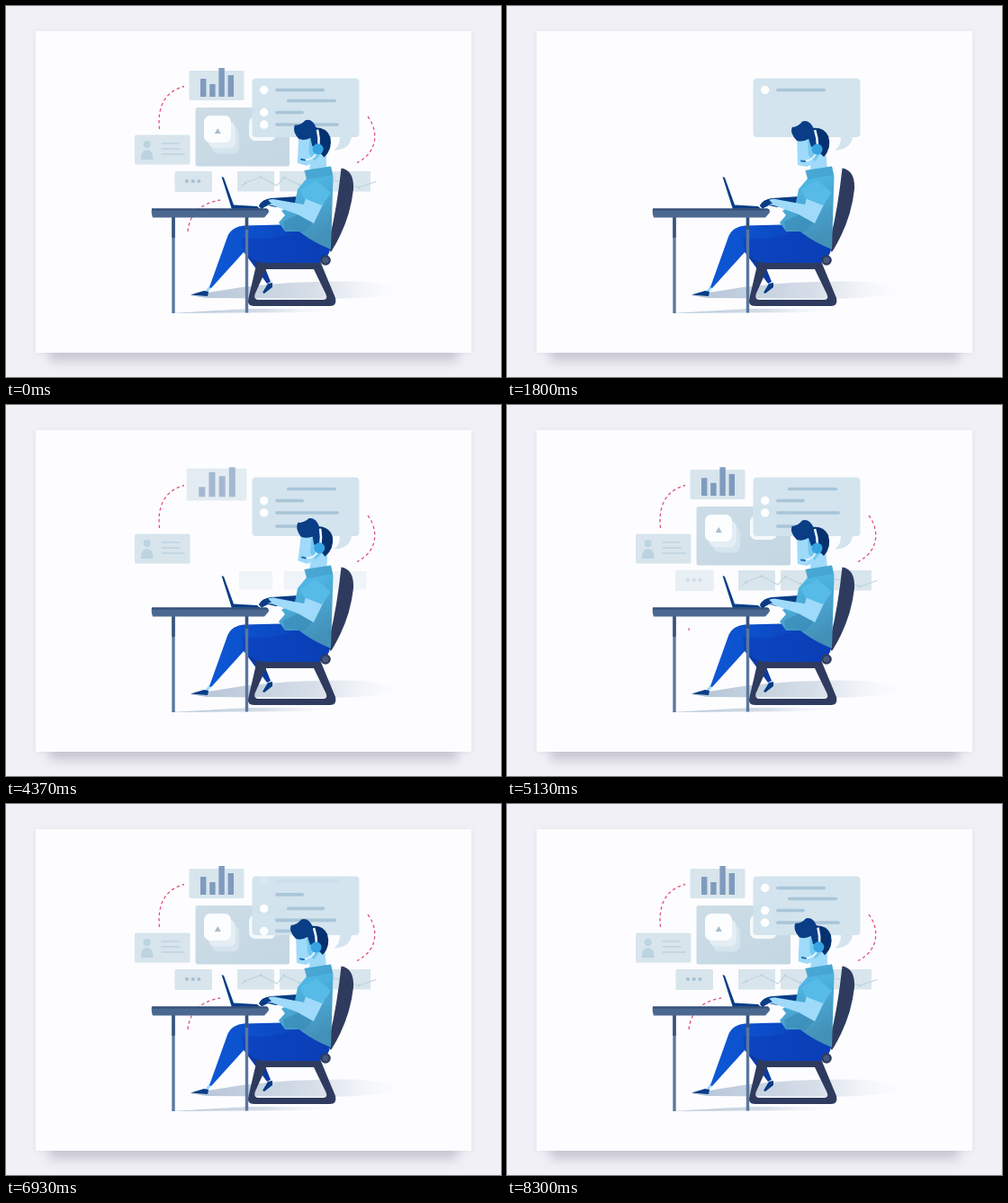
Write an HTML page that moves like this. It is 550 px wide and 413 px high and loops after 8330 ms.

```html
<!DOCTYPE html>
<html lang="en">
<head>
<meta charset="utf-8">
<title>At the desk</title>
<style>
html, body { margin: 0; width: 100%; height: 100%; overflow: hidden; background: #f1f0f6; }
svg { display: block; width: 100vw; height: 100vh; }
.glow { fill: #77778c; opacity: .3; filter: blur(6px); }
.sheet { fill: #fdfdff; filter: drop-shadow(0 1px 3px rgba(110, 110, 140, .1)); }
.dash { fill: none; stroke: #e0527f; stroke-width: 1.3; }
.card { fill: #d8e5ed; }
.mark { fill: #bcd3e0; }
.thin { fill: none; stroke: #bdd2df; stroke-width: 1.6; stroke-linecap: round; }
.navy { fill: #093d86; }
.chair { fill: #2f3b5e; }
.skin { fill: #9fdafa; }
</style>
</head>
<body>
<svg viewBox="0 0 550 413" preserveAspectRatio="none">
  <defs>
    <linearGradient id="floor">
      <stop offset="0" stop-color="#b4c4d7"/><stop offset=".55" stop-color="#d6dee8"/>
      <stop offset="1" stop-color="#fdfdff" stop-opacity="0"/>
    </linearGradient>
    <linearGradient id="shirt" x2=".3" y2="1">
      <stop offset=".3" stop-color="#4fb6e4"/><stop offset="1" stop-color="#4390b8"/>
    </linearGradient>
    <linearGradient id="jeans">
      <stop offset="0" stop-color="#0d58d6"/><stop offset="1" stop-color="#0b3fb6"/>
    </linearGradient>
    <linearGradient id="pane" y2="1">
      <stop offset="0" stop-color="#cddde7"/><stop offset="1" stop-color="#c3d6e2"/>
    </linearGradient>
  </defs>
  <rect class="glow" x="48" y="372" width="454" height="24"/>
  <rect class="sheet" x="33" y="28" width="484" height="358"/>
  <path fill="url(#floor)" d="M205 322L262 313Q330 305 400 307L456 318Q410 325 362 326L222 325Z"/>
  <path fill="url(#floor)" d="M183 342L270 337H376L340 341Z"/>

  <g id="person">
    <rect class="card" x="143" y="143.500" width="61.500" height="33" rx="1.500"/>
    <circle class="mark" cx="156.700" cy="154" r="4"/>
    <path class="mark" d="M150 171Q150 160 156.700 160T163.500 171Z"/>
    <path class="thin" d="M173 153H192M173 159H193M173 165H198"/>
  </g>
  <g id="chart">
    <rect class="card" x="203.500" y="72" width="61" height="33" rx="1.500"/>
    <g id="bars" fill="#7f9bbd"></g>
  </g>
  <g id="window">
    <rect x="210.500" y="113" width="104.500" height="65.500" rx="2.500" fill="url(#pane)"/>
    <rect x="229" y="135" width="30" height="29.500" rx="7" fill="#d5e4ed"/>
    <rect x="225" y="129" width="30" height="29.500" rx="7" fill="#e5eef4"/>
    <rect x="220" y="122" width="30" height="30" rx="7" fill="#fbfdfe"/>
    <path d="M235.300 136L238.800 142H231.800Z" fill="#a9bccb"/>
    <rect x="270" y="123" width="30" height="27" rx="7" fill="#f4f9fb"/>
  </g>
  <g id="dots">
    <rect class="card" x="187.500" y="184" width="41.500" height="23" rx="1.500"/>
    <g fill="#a8c1d2"><circle cx="201" cy="195" r="2.100"/><circle cx="207.700" cy="195" r="2.100"/><circle cx="214.300" cy="195" r="2.100"/></g>
  </g>
  <rect id="tileA" class="card" x="257" y="184" width="41" height="22.500"/>
  <rect id="tileB" class="card" x="304" y="184" width="101" height="22.500"/>
  <g id="wave">
    <path class="thin" style="stroke-width:1.100" d="M262 200L268 196 283 190.500 301 200 309 191 330 201 350 192 370 195 392 202 411 195.500"/>
    <g class="mark"><circle cx="266" cy="197" r="1.500"/><circle cx="283" cy="190.500" r="1.500"/><circle cx="309" cy="191" r="1.500"/><circle cx="326" cy="199" r="1.500"/><circle cx="392" cy="202" r="1.500"/></g>
  </g>
  <path class="dash" id="arcL" d="M170.500 137C168 115 175 95 198 89.500"/>
  <path class="dash" id="arcR" d="M402 123C413 137 415 162 390 174.500"/>
  <path class="dash" id="arcD" d="M202 251C204 232 215 220 238 216"/>

  <g id="bubble">
    <path fill="#d2e4ee" fill-opacity=".97" d="M278 80.500H388Q392.500 80.500 392.500 85V142Q392.500 146 388 146H384Q382 160 364 160.500Q371 156 371 146H278Q273.500 146 273.500 142V85Q273.500 80.500 278 80.500Z"/>
    <g id="rows"></g>
  </g>

  <!-- chair -->
  <path class="chair" d="M372.500 180.500Q387 183 386 204Q382 241 361 274L357 268Q367 232 372.500 180.500Z"/>
  <!-- far leg -->
  <path fill="#0a3aa6" d="M262 271L282 277 294 307 290 309 276 290Z"/>
  <path class="navy" d="M291 309L296 308 296 313 287 320 285 319Z"/>
  <path class="chair" fill-rule="evenodd" d="M279 284H349L366 325Q368 334 360 334H276Q267 334 269.500 325ZM289 293L276.500 321Q275 327 281 327H352Q358 327 355.500 321L342 293Z"/>
  <!-- near leg -->
  <path class="skin" d="M226 311L228 314 224 319 221 318Z"/>
  <path class="navy" d="M205 321.500L220 317 225 318 224 323Z"/>
  <path fill="url(#jeans)" d="M226 313L246 257Q250 246 264 244.500L325 243Q352 252 360 269Q360 280 348 286H286Q272 283 265 273L228 314Z"/>
  <path fill="#0a3fb8" d="M262 258Q300 262 322 250L358 270Q356 282 347 286H286Q272 283 264 272Z" opacity=".6"/>
  <circle class="chair" cx="355" cy="283" r="5.800"/>
  <circle cx="355" cy="283" r="3.500" fill="#46597c"/>

  <!-- laptop, far arm, desk -->
  <path class="navy" d="M239.500 190L242 191 253 221.500 279 223 283 226.500H251Z"/>
  <path class="navy" d="M281 222Q285 215 294 214L324 212 326 220 300 224 291 222 285 225Z"/>
  <rect x="184.300" y="235" width="3.400" height="107" fill="#5b789f"/>
  <rect x="184.300" y="235" width="3.400" height="23" fill="#37537c"/>
  <rect x="265.800" y="235" width="3.400" height="106.500" fill="#5b789f"/>
  <rect x="265.800" y="235" width="3.400" height="14" fill="#37537c"/>
  <path fill="#4b6990" d="M162 225.500H289Q294 228 291 231L287 235.500H163Q161 231 162 225.500Z"/>
  <path fill="#334f79" d="M162 225.500H290L292 227.500H162Z"/>

  <g id="head">
    <path class="skin" d="M338 158H354L356 183 337 184Z"/>
    <path class="skin" d="M322 146L345 142 352 160 346 173 333 179 323 177Z"/>
    <path fill="#72c8f0" d="M334 150L345 148 349 164 342 173 335 166Z"/>
    <path fill="#06316f" d="M338 136Q352 134 357 145Q361 158 352 168L347 163Z"/>
    <path class="navy" d="M322 150Q314 142 316.500 135Q323 135 328 128.500Q336 126 341 137L346 154 338 157 335 148Q328 152 322 150Z"/>
    <path fill="none" stroke="#e8f6fd" stroke-width="2.600" d="M342 138Q345 147 345 156"/>
    <path fill="none" stroke="#e8f6fd" stroke-width="1.800" d="M343 164Q340 173 328 173"/>
    <path stroke="#1d6fb5" stroke-width="2" stroke-linecap="round" d="M327 172.500L331 173"/>
    <circle cx="344.500" cy="159.500" r="6" fill="#37a3e2"/>
  </g>

  <!-- torso -->
  <path fill="url(#shirt)" d="M332 183L361 178.500 363.500 190 361 271Q339 262 326 251L310 251 303 241 310 233 306 228 321 219 324 204 334 192Z"/>
  <path fill="#3f93bf" d="M331 183L361 178.500 363 188 334 193Z" opacity=".45"/>
  <path fill="#398dba" d="M308 240L331 229 341 241 331 252Q320 248 310 250Z" opacity=".7"/>
  <g id="arm">
    <path class="skin" d="M286 221Q290 215 297 215L331 221 334 210 354 217 342 242 324 232 296 222Z"/>
    <path class="navy" d="M281 223Q284 216 291 216L295 220 289 222 284 226Z"/>
  </g>
  <path fill="#57bbe8" d="M327 204L345 194 361 208 351 222 331 214Z"/>
</svg>
<script>
const LOOP = 8330;
const $ = id => document.getElementById(id);
const clamp = v => Math.max(0, Math.min(1, v));
const ramp = (t, a, b) => clamp((t - a) / (b - a));
const smooth = (t, a, b) => { const u = ramp(t, a, b); return u * u * (3 - 2 * u); };
const back = (u, k) => 1 + (k + 1) * (u - 1) ** 3 + k * (u - 1) ** 2;

// id, pivot, enter time, duration, overshoot, exit time
const pops = [
  ['person', 173.5, 160, 3275, 420, 2.2, 120],
  ['chart', 234, 88.5, 4130, 450, 1.7, 160],
  ['tileA', 277.5, 195, 4235, 450, 1.7, 60],
  ['tileB', 354.5, 195, 4235, 450, 1.7, 60],
  ['window', 263, 146, 4550, 450, 1.2, 100],
  ['dots', 208, 195.5, 4950, 450, 1.7, 30],
  ['bubble', 366, 160, 950, 450, 1, 250]
];
// id, drawing start, drawing end
const arcs = [['arcL', 3450, 4100], ['arcR', 3550, 4220], ['arcD', 5050, 5650]];

const add = (tag, parent, attrs) => {
  const el = document.createElementNS('http://www.w3.org/2000/svg', tag);
  for (const k in attrs) el.setAttribute(k, attrs[k]);
  return parent.appendChild(el);
};

const early = [10, 25, 21, 30], late = [20, 14, 32, 24];
const bars = early.map((h, i) => add('rect', $('bars'), { x: 216 + 10.2 * i, width: 6.4 }));

// offset down the list, line start, line end, has avatar, first appearance
const LIST = 94;
const rows = [
  [0, 299, 354, 1, 1520], [12, 312, 367, 0, 1900], [25, 299, 331, 1, 2100], [38.5, 299, 370, 1, 2300],
  [53.5, 299, 331, 0, 2450], [69, 312, 354, 1, 2450], [82, 299, 367, 0, 2450]
].map(([top, a, b, avatar, start]) => {
  const el = add('g', $('rows'), {});
  if (avatar) add('circle', el, { cx: 286.7, r: 4.7, fill: '#fff' });
  add('rect', el, { x: a, y: -1.8, width: b - a, height: 3.6, rx: 1.8, fill: '#a9c5d8' });
  return { el, top, start };
});
// one scroll step per row
const steps = [[2550, 2900], [5860, 6115], [6450, 6700], [6820, 7040], [7250, 7500], [7650, 7900], [8020, 8290]];

function draw(t) {
  const leaving = t < 800;
  for (const [id, x, y, start, dur, k, end] of pops) {
    const u = ramp(t, start, start + dur);
    const left = 1 - smooth(t, end, end + 380);
    const s = leaving ? left : u && back(u, k);
    $(id).setAttribute('transform', `translate(${x} ${y}) scale(${s}) translate(${-x} ${-y})`);
    $(id).setAttribute('opacity', leaving ? left : clamp(u * 1.3));
  }
  $('wave').setAttribute('opacity', leaving ? 1 - ramp(t, 30, 300) : ramp(t, 4600, 5100));

  for (const [id, a, b] of arcs) {
    const len = $(id).getTotalLength();
    const shown = len * (leaving ? 1 - smooth(t, 40, 500) : smooth(t, a, b));
    const n = Math.floor(shown / 6.5);
    $(id).setAttribute('stroke-dasharray', '3.5 3 '.repeat(n) + Math.min(3.5, shown - 6.5 * n) + ' 999');
    $(id).setAttribute('opacity', shown > 0 ? 1 : 0);
  }

  const mix = leaving ? 1 : smooth(t, 4450, 5200);
  bars.forEach((bar, i) => {
    const h = early[i] + (late[i] - early[i]) * mix;
    bar.setAttribute('y', 101 - h);
    bar.setAttribute('height', h);
  });

  const scroll = steps.reduce((sum, [a, b], i) => {
    const next = i < 6 ? rows[i + 1].top : LIST;
    return sum + (next - rows[i].top) * smooth(t, a, b);
  }, 0);
  rows.forEach(({ el, top, start }) => {
    let drop = (top - scroll + LIST) % LIST;
    if (drop > 76) drop -= LIST;
    const y = 93.5 + drop;
    const seen = leaving ? 1 : ramp(t, start, start + 160);
    el.setAttribute('transform', `translate(0 ${y})`);
    el.setAttribute('opacity', seen * clamp((145 - y) / 4) * clamp((y - 85) / 7));
  });

  // the head nods four times per loop
  const p = (t / LOOP * 4 + 0.16) % 1;
  const nod = 9.5 * (smooth(p, 0, 0.31) - smooth(p, 0.31, 0.5));
  $('head').setAttribute('transform', `rotate(${nod} 348 184)`);
  const tap = 0.8 * Math.sin(t / LOOP * 2 * Math.PI * 16);
  $('arm').setAttribute('transform', `rotate(${tap} 343 222)`);
}

const begin = performance.now();
function tick() {
  draw((performance.now() - begin) % LOOP);
  requestAnimationFrame(tick);
}
tick();
</script>
</body>
</html>
```
